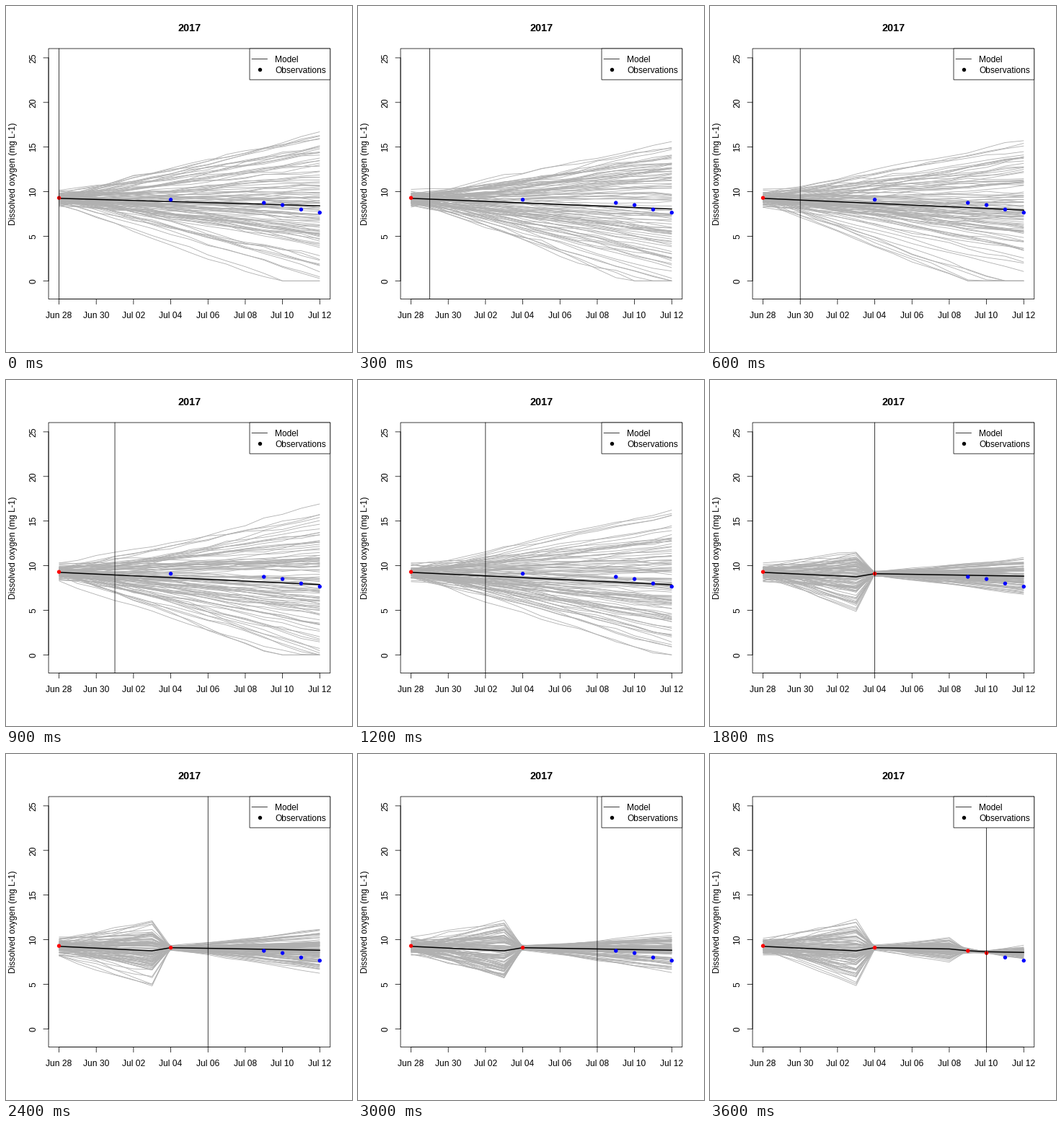
A matplotlib script for the animation above (3.9 s loop, 480 px wide and 480 px high).

```python
import numpy as np
import matplotlib.pyplot as plt
from matplotlib.animation import FuncAnimation
from matplotlib.collections import LineCollection
from matplotlib.patches import Rectangle

SIZE, DPI = 480, 100
PX = 72 / DPI
DAYS, RUNS, MEMBERS = 14, 13, 100
LEFT, RIGHT, TOP, BOTTOM = 59.04, 449.76, 59.04, 406.56
THIN = 0.75
OBS = {0: 9.3, 6: 9.1, 11: 8.75, 12: 8.5, 13: 8.0, 14: 7.65}
OBS_SD = 0.12

plt.rcParams["font.family"] = "Liberation Sans"
plt.rcParams["path.snap"] = False


def px(day):
    return LEFT + (RIGHT - LEFT) * (day / DAYS + 0.04) / 1.08


def py(value):
    return BOTTOM - (BOTTOM - TOP) * ((value + 1) / 26 + 0.04) / 1.08


def leg(rng, days, start, drift, spread, scale):
    """Mean and members over some days: own offset, own trend, random walk."""
    t = np.arange(days)
    mean = start + drift * t
    offset = rng.normal(0, spread, (MEMBERS, 1)).clip(-2.5 * spread, 2.5 * spread)
    trend = rng.triangular(-0.85, 0.08, 0.62, (MEMBERS, 1))
    trend -= trend.mean()
    walk = rng.normal(0, 0.13, (MEMBERS, days)).cumsum(axis=1)
    walk -= walk[:, :1]
    return mean, np.maximum(mean + offset + scale * (trend * t + walk), 0)


def forecast(run):
    """Restart the ensemble near each observation known on the run day."""
    rng = np.random.default_rng(2017 + run)
    starts = [day for day in OBS if day <= run]
    stops = starts[1:] + [DAYS + 1]
    legs = [leg(rng, stops[0], 9.25, 0.04 * np.exp(-run) - 0.1, 0.42, 1)]
    for start, stop in zip(starts[1:], stops[1:]):
        mean, members = legs[-1]
        var = members[:, -1].var()
        gain = var / (var + OBS_SD ** 2)
        analysis = mean[-1] + gain * (OBS[start] - mean[-1])
        legs.append(leg(rng, stop - start, analysis, -0.035,
                        OBS_SD * np.sqrt(gain), 0.45))
    means, members = zip(*legs)
    return np.concatenate(means), np.hstack(members)


fig = plt.figure(figsize=(SIZE / DPI, SIZE / DPI), dpi=DPI, facecolor="white")
ax = fig.add_axes([0, 0, 1, 1])
ax.set(xlim=(0, SIZE), ylim=(SIZE, 0))
ax.axis("off")


def line(xs, ys, width=THIN, **kw):
    return ax.plot(xs, ys, color="black", lw=width * PX,
                   solid_capstyle="round", snap=False, **kw)[0]


def label(x, y, text, size=12, **kw):
    style = dict(ha="center", va="baseline") | kw
    ax.text(x, y, text, fontsize=size * PX, color="black", **style)


def side_label(x, y, text):
    label(x, y, text, rotation=90, ha="right", va="center")


def dots(x, y, color, z):
    return ax.scatter(x, y, s=(5.4 * PX) ** 2, c=color, linewidths=0,
                      zorder=z, snap=False)


def box(x, y, right, bottom, z):
    ax.add_patch(Rectangle((x, y), right - x, bottom - y, fc="white",
                           ec="black", lw=THIN * PX, zorder=z, snap=False))


# Plot frame and axes
box(LEFT, TOP, RIGHT, BOTTOM, 0)
label((LEFT + RIGHT) / 2, 35, "2017", 14.4, weight="bold")
side_label(16, (TOP + BOTTOM) / 2, "Dissolved oxygen (mg L-1)")
line([px(0), px(DAYS)], [BOTTOM] * 2, zorder=1)
line([LEFT] * 2, [py(0), py(25)], zorder=1)
for day in range(0, DAYS + 1, 2):
    line([px(day)] * 2, [BOTTOM, BOTTOM + 7.2])
    name = f"Jun {28 + day}" if day < 3 else f"Jul {day - 2:02d}"
    label(px(day), 433, name)
for value in range(0, 26, 5):
    line([LEFT - 7.2, LEFT], [py(value)] * 2)
    side_label(44, py(value), str(value))

# Legend
box(338, TOP, RIGHT, 102.2, 8)
line([341, 362.6], [73.4] * 2, zorder=9)
dots([351.8], [87.8], "black", 9)
for y, text in ((77.8, "Model"), (92.6, "Observations")):
    label(373.3, y, text, ha="left", zorder=9)

# Moving parts
ensemble = ax.add_collection(LineCollection(
    [], colors="#b0b0b0", linewidths=0.85 * PX, zorder=2))
mean_line = line([], [], 1.5, zorder=3)
obs = dots([px(d) for d in OBS], [py(v) for v in OBS.values()], "blue", 4)
today = line([], [], zorder=5)

days_x = px(np.arange(DAYS + 1))
forecasts = [forecast(run) for run in range(RUNS)]


def update(run):
    mean, members = forecasts[run]
    ensemble.set_segments([np.column_stack([days_x, py(m)]) for m in members])
    mean_line.set_data(days_x, py(mean))
    obs.set_facecolor(["red" if day <= run else "blue" for day in OBS])
    today.set_data([px(run)] * 2, [TOP, BOTTOM])
    return ensemble, mean_line, obs, today


anim = FuncAnimation(fig, update, frames=RUNS, interval=300, repeat=True,
                     repeat_delay=0, blit=False)
plt.show()
```
